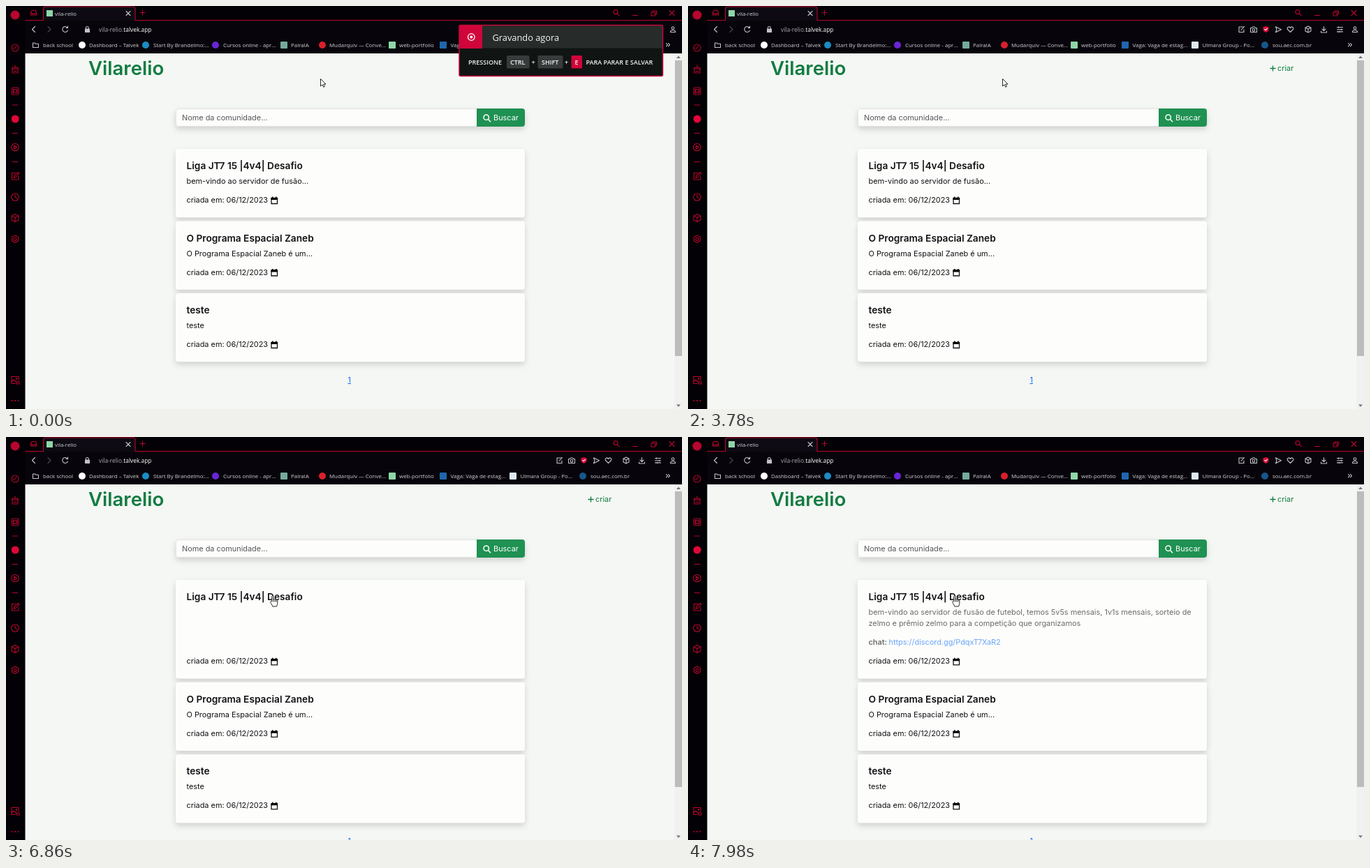
Animation of 968x578 px, one loop 8 s. Source, as an HTML page:

```html
<!DOCTYPE html>
<html lang="pt">
<head>
<meta charset="utf-8">
<title>vila-relio</title>
<style>
html, body { margin: 0; width: 100%; height: 100%; overflow: hidden; background: #f5f7f4; }
svg { display: block; width: 968px; height: 578px; }
text { white-space: pre; }
.page text { font: 400 10.9px Inter, "Open Sans", sans-serif; fill: #101214; }
.page .head { font-size: 13.7px; font-weight: 600; }
.page .brand { font-size: 27.6px; font-weight: 600; fill: #117c41; }
.page .link { fill: #0d6efd; }
.ui text { font: 400 7.9px "Open Sans", "Noto Sans", sans-serif; fill: #d3d1d6; }
.toast text { font: 600 9px "Open Sans", "Noto Sans", sans-serif; fill: #f4f4f4; }
.line { fill: none; stroke-width: 1.1; stroke-linecap: round; stroke-linejoin: round; }
.red { stroke: #b8062f; }
.grey { stroke: #c4c2c9; }
.card { fill: #fdfdfb; filter: drop-shadow(0 4px 4.5px rgba(0, 0, 0, .15)); }
</style>
</head>
<body>
<svg viewBox="0 0 968 578">
  <g class="page">
    <rect width="968" height="578" fill="#f5f7f4"/>
    <text class="brand" x="118" y="99">Vilarelio</text>
    <path d="M833.500 89.500h8M837.500 85.500v8" stroke="#117c41" stroke-width="1.300"/>
    <text x="844" y="92.500" style="fill:#117c41">criar</text>
    <rect class="card" x="243" y="147" width="500" height="26" rx="4"/>
    <path d="M674 147.500H247a3.500 3.500 0 0 0-3.500 3.500v18a3.500 3.500 0 0 0 3.500 3.500H674" fill="none" stroke="#e1e4e5"/>
    <text x="252" y="164" style="fill:#55585b">Nome da comunidade...</text>
    <path d="M674 147h65a4 4 0 0 1 4 4v18a4 4 0 0 1-4 4h-65z" fill="#1f9152"/>
    <g fill="none" stroke="#fff" stroke-width="1.500"><circle cx="687.700" cy="159.700" r="3.700"/><path d="M690.500 162.500l3.500 3.700"/></g>
    <text x="698" y="164" style="fill:#fff">Buscar</text>
    <g id="cards"></g>
    <g id="pager"><text class="link" x="489.500" y="540" text-decoration="underline">1</text></g>
    <rect x="957" y="68" width="11" height="510" fill="#f1f1f1"/>
    <rect x="958" y="78" width="10" height="424" fill="#bcbcbc"/>
    <path d="M960 75l3-3.500 3 3.500zM960 571.500l3 3.500 3-3.500z" fill="#777"/>
  </g>

  <g class="ui">
    <path d="M0 0H968V68H27.500V578H0z" fill="#030105"/>
    <path d="M27.500 20.500H968V68H27.500z" fill="#07050b"/>
    <path d="M53.500 21V4a3 3 0 0 1 3-3H182a3 3 0 0 1 3 3V21z" fill="#0d0a13"/>
    <path class="line red" d="M27.500 20.500H53.500V4a3 3 0 0 1 3-3H182a3 3 0 0 1 3 3V20.500H968"/>
    <rect x="58" y="6" width="9" height="9" fill="#8fd6a8"/>
    <text x="70" y="13.500">vila-relio</text>
    <path class="line grey" d="M172 7.500l6 6m0-6l-6 6"/>
    <g class="line red">
      <path d="M35.500 9l1.500-2.500h5L43.500 9v4h-8zM35.500 10.500h2l.7 1h2.600l.7-1h2M192 9.500h7m-3.500-3.500v7"/>
      <circle cx="873" cy="8.500" r="3"/><path d="M875.300 10.800l3 3M897.500 13.500h7M924 9h5.500v5H924zM926 9V7h5.500v5H930M950 6.500l7 7m0-7l-7 7"/>
    </g>
    <g class="line grey">
      <path d="M41.500 29.500l-4 4 4 4M88 31a4 4 0 1 0 .5 4M88.500 29v2.500H86"/>
      <path d="M60 29.500l4 4-4 4" stroke="#4b4850"/>
      <path d="M114.300 33v-1.500a2 2 0 0 1 4 0V33"/><rect x="113.500" y="33" width="6" height="4.500" fill="#c4c2c9"/>
      <path d="M796 30h-7v7.500h7V34M792 34.500l4.500-5M805.500 31.500h2l1-1.500h3l1 1.500h2v6h-9z"/><circle cx="810" cy="34.300" r="1.800"/>
      <path d="M841.500 29.800l8 4-8 4 1.500-4zM862.500 37.500l-4-4c-1.500-3 2.500-5 4-2 1.500-3 5.500-1 4 2z"/>
      <path d="M888 29l4 2v5l-4 2-4-2v-5zM884 31l4 2 4-2M888 33v5M910.500 29.500v6m-2.500-2.500l2.500 2.500 2.500-2.500M906.500 36v2h8v-2M929.500 30.500h8m-8 3.200h8m-8 3.200h8M931.500 29.800v1.400m4 1.800v1.400m-3 1.800v1.400"/>
      <circle cx="955" cy="31.500" r="1.800"/><path d="M951.500 37.500c0-4 7-4 7 0z"/>
      <path d="M38.500 53h3l1 1.200h4v5.300h-8zM945.500 53.500l2 2.200-2 2.200m3-4.400l2 2.200-2 2.200"/>
    </g>
    <path d="M827.500 29l4 1.200v3.500c0 2-2 3.500-4 4.300-2-.8-4-2.300-4-4.300v-3.500z" fill="#df0a3a"/>
    <path class="line" d="M825.700 33.300l1.400 1.400 2.200-2.400" stroke="#fff"/>
    <text x="133" y="37" style="font-size:8.400px"><tspan fill="#aaa7ae">vila-relio.</tspan><tspan fill="#fff">talvek.app</tspan></text>
    <g id="marks"></g>
    <circle cx="13" cy="13" r="6.500" fill="#b8062f"/>
    <circle cx="13.200" cy="162" r="5.500" fill="#e00639"/>
    <g class="line red">
      <circle cx="13" cy="60" r="5"/><path d="M12 61l3-3.500M10 60.500h1"/>
      <path d="M9 90h8v6H9zM8.500 90l1-2h7l1 2M13 88v-3M11 93.500h4"/>
      <rect x="8.500" y="117" width="9.500" height="10" rx="1.500"/><circle cx="13.200" cy="122" r="2.500"/><path d="M10.500 119v6m5.400-6v6"/>
      <path d="M9.500 142h7M9.500 182.500h7M9.500 223.500h7"/>
      <circle cx="13" cy="202.500" r="5.300"/><path d="M11.500 200l4 2.500-4 2.500z"/>
      <path d="M14 239.500H8.500v9.500h9.500v-5M11 246.500l1-3 5.500-5 1.500 1.500-5 5.500z"/>
      <circle cx="13" cy="274" r="5.300"/><path d="M13 270.500v3.500l2.500 1.500"/>
      <path d="M13 298.500l5 2.500v6l-5 2.500-5-2.500v-6zM8 301l5 2.500 5-2.500M13 303.500v6"/>
      <path d="M13 329l4.500 2.600v5.200L13 339.500l-4.500-2.700v-5.200z"/><circle cx="13" cy="334.300" r="2"/>
      <path d="M18 537v-5.500H8v10h5M8 539l3-3 3 3M15 539h4v3h-4z"/><circle cx="15" cy="534.500" r=".7"/>
      <path d="M8.500 566h.1m4.400 0h.1m4.400 0h.1" stroke-width="2"/>
    </g>
  </g>

  <g class="toast" id="toast">
    <rect x="649" y="27.500" width="291.500" height="73" rx="2" fill="#101413"/>
    <rect x="650" y="28" width="290" height="32.500" fill="#272b2a"/>
    <rect x="649" y="28" width="33" height="33" fill="#d0053a"/>
    <rect x="649" y="27.500" width="291.500" height="73" rx="2" fill="none" stroke="#c4093a" stroke-width="1.500"/>
    <circle cx="666.300" cy="44.500" r="4.800" fill="none" stroke="#fff" stroke-width="1.300"/><circle cx="666.300" cy="44.500" r="2" fill="#fff"/>
    <text x="696.500" y="49.500" style="font-size:12.800px;font-weight:400">Gravando agora</text>
    <rect x="717" y="71" width="32.500" height="18.500" rx="1.500" fill="#373b3b"/>
    <rect x="761.500" y="71" width="36" height="18.500" rx="1.500" fill="#373b3b"/>
    <rect x="809.500" y="71" width="15.500" height="18.500" rx="1.500" fill="#d0053a"/>
    <text x="662" y="84">PRESSIONE</text>
    <text x="722" y="84">CTRL</text>
    <text x="752.500" y="84">+</text>
    <text x="767" y="84">SHIFT</text>
    <text x="800" y="84">+</text>
    <text x="814.500" y="84">E</text>
    <text x="830.500" y="84">PARA PARAR E SALVAR</text>
  </g>

  <g id="cursor" fill="#fff" stroke="#111" stroke-width=".9" stroke-linejoin="round">
    <path id="arrow" d="M.5.500V11L3 8.800l1.700 3.500 1.700-.8-1.700-3.400H8z"/>
    <path id="hand" d="M-.8 8.500V1.200C-.8-.3 1.300-.3 1.300 1.200V5.500c.3-1 2-.9 2.100.2.400-.8 1.900-.6 2 .5.500-.6 1.900-.4 1.900.9V11c0 1.700-1 2.600-1.200 4.500H.3C0 13.500-2.500 11.500-2.700 9.200c-.1-1.300 1.300-1.500 1.900-.7zM1.300 5.500V9M3.400 6v3M5.400 6.500V9"/>
  </g>
</svg>
<script>
const $ = id => document.getElementById(id);
const LOOP = 8000, GROW = 43.3, PITCH = 103.5;
const clamp = v => Math.max(0, Math.min(1, v));
const span = (t, from, to) => clamp((t - from) / (to - from));
const smooth = p => p * p * (3 - 2 * p);
const text = (x, y, s, cls = '') => `<text x="${x}" y="${y}" class="${cls}">${s}</text>`;

// Bookmarks: icon x, shape, colour, label x, label
$('marks').innerHTML = [
  [0, '', '', 53, 'back school'],
  [109, 'o', '#fff', 119, 'Dashboard – Talvek'],
  [200, 'o', '#1c8bc4', 211, 'Start By Brandelmo:...'],
  [300, 'o', '#6a25d6', 311, 'Cursos online - apr...'],
  [398, 's', '#74aa9c', 408, 'PalraIA'],
  [453, 'o', '#d8202c', 463, 'Mudarquiv — Conve...'],
  [553, 's', '#8fd6a8', 563, 'web-portfolio'],
  [626, 's', '#1f66b0', 636.5, 'Vaga: Vaga de estag...'],
  [726, 's', '#dfe8f5', 736.5, 'Ulmara Group - Po...'],
  [826, 'o', '#17568c', 837, 'sou.aec.com.br']
].map(([x, shape, color, tx, label]) =>
  (shape && `<rect x="${x - 5}" y="51" width="10" height="10" rx="${shape === 'o' ? 5 : 1}" fill="${color}"/>`)
  + text(tx, 59, label)).join('');

const card = (title, brief, i) => `<g id="card${i}">
  <rect class="card" x="243" y="205" width="500" height="98.300" rx="3.500"/>
  ${text(258.5, 234, title, 'head')}<g class="brief">${text(258.5, 255, brief)}</g>
  <g class="date">${text(258.5, 282, 'criada em: 06/12/2023')}
    <path d="M380 275.500h8.500v8H380z" fill="none" stroke="#101214" stroke-width="1.300"/>
    <path d="M379.500 275h9.500v3h-9.500zM381 273.500h1.500v2H381zM386 273.500h1.500v2H386z"/></g></g>`;

$('cards').innerHTML = [
  ['Liga JT7 15 |4v4| Desafio', 'bem-vindo ao servidor de fusão...'],
  ['O Programa Espacial Zaneb', 'O Programa Espacial Zaneb é um...'],
  ['teste', 'teste']
].map(([title, brief], i) => card(title, brief, i)).join('')
+ `<g id="full">
  ${text(258.5, 255, 'bem-vindo ao servidor de fusão de futebol, temos 5v5s mensais, 1v1s mensais, sorteio de')}
  ${text(258.5, 271, 'zelmo e prêmio zelmo para a competição que organizamos')}
  <text x="258.500" y="298" style="font-weight:600">chat:</text>
  ${text(287.5, 298, 'https://discord.gg/PdqxT7XaR2', 'link')}</g>`;

const first = $('card0'), box = first.querySelector('rect');
const brief = first.querySelector('.brief'), date = first.querySelector('.date');
const shift = (el, x, y) => el.setAttribute('transform', `translate(${x} ${y})`);

function draw(t) {
  $('toast').setAttribute('opacity', 1 - span(t, 3600, 3780));

  const go = smooth(span(t, 5260, 5840)), nudge = smooth(span(t, 5980, 6120));
  const x = 450 - 71.5 * go + 3 * nudge, y = 104 + 127.5 * go - 4 * nudge;
  shift($('cursor'), x, y);
  const over = y > 205;
  $('arrow').style.display = over ? 'none' : '';
  $('hand').style.display = over ? '' : 'none';

  const open = t >= 6860, dy = open ? GROW : 0;
  box.setAttribute('height', 98.3 + dy);
  brief.style.display = open ? 'none' : '';
  shift(date, 0, dy);
  shift($('card1'), 0, PITCH + dy);
  shift($('card2'), 0, 2 * PITCH + dy);
  shift($('pager'), 0, dy);
  $('full').setAttribute('opacity', clamp((t - 7060) / 1500));
}

const start = performance.now();
function tick() {
  draw((performance.now() - start) % LOOP);
  requestAnimationFrame(tick);
}
tick();
</script>
</body>
</html>
```
